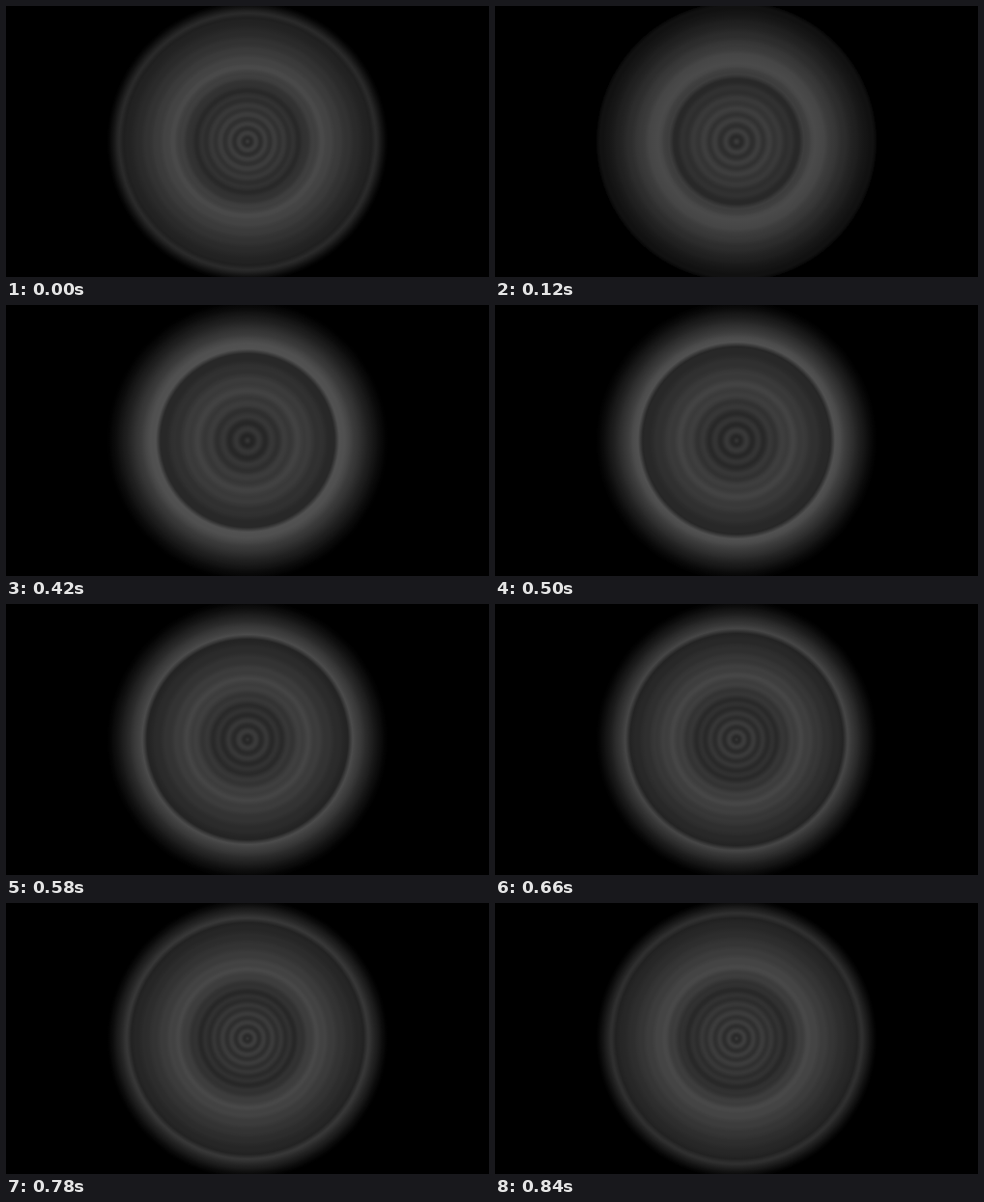
An HTML page with a canvas that plays this animation: 500x281 px, repeating every 0.88 s.

```html
<!DOCTYPE html>
<html>
<head>
<meta charset="utf-8">
<title>Ripples</title>
<style>
html, body { margin: 0; width: 100%; height: 100%; overflow: hidden; background: #000; }
canvas { display: block; width: 100vw; height: 100vh; }
</style>
</head>
<body>
<canvas id="stage" width="500" height="281"></canvas>
<script>
const ctx = document.getElementById('stage').getContext('2d');
const LOOP = 880;
const EDGE = 145;
const SPACING = 73;      // distance between two fronts, travelled once per loop
const FIRST_FRONT = 58;
const TAU = 2 * Math.PI;

// spans during which the picture rests
const rests = [[0, 60], [120, 200], [520, 580], [780, 840]];

const clamp01 = x => Math.min(1, Math.max(0, x));
const mix = (a, b, u) => a + (b - a) * u;
const rim = (r, width) => Math.sqrt(clamp01((EDGE - r) / width));

// grey of the brightest and darkest part of the big wave at a radius
const peak = r => Math.min(42 + 0.4 * r, 85 * rim(r, 45));
const trough = r => (48 - 0.12 * r) * rim(r, 17);

function steppedTime(t) {
  const rest = rests.find(([from, to]) => t >= from && t < to);
  return rest ? rest[0] : Math.floor(t / 20) * 20;
}

// Each front jumps up to a hump and falls off until the next front or the edge.
function bigWave(r, lead) {
  const front = lead + SPACING * Math.floor((r - lead) / SPACING);
  const end = Math.min(front + SPACING, EDGE);
  const hump = front + Math.max(2, 0.38 * (110 - front));
  const top = peak(hump);
  if (r < hump) {
    const sharpness = clamp01((front - 50) / 35);
    const foot = mix(trough(front), top, sharpness);
    return mix(foot, top, (r - front) / (hump - front));
  }
  const fall = 1 - Math.pow(clamp01(1 - (r - hump) / (end - hump)), 1.15);
  return mix(top, trough(end), fall);
}

function softWave(r, lead) {
  let sum = 0;
  for (let d = -2; d <= 2; d++) sum += bigWave(Math.min(EDGE, Math.abs(r + d)), lead);
  return sum / 5;
}

// Rings around the centre whose spacing breathes once per loop.
function rings(r, phase) {
  const spacing = 11.3 + 2.2 * Math.cos(TAU * (phase - 0.38));
  const shift = 0.1 * Math.sin(TAU * phase) - 0.1;
  return 11 * Math.exp(-r / 45) * Math.cos(TAU * (r / spacing - shift));
}

function draw(t) {
  const phase = steppedTime(t) / LOOP;
  const lead = FIRST_FRONT + SPACING * phase;
  const fill = ctx.createRadialGradient(250, 140.5, 0, 250, 140.5, EDGE);
  for (let r = 0; r <= EDGE; r++) {
    const fade = clamp01((EDGE - r) / 20);
    const v = Math.max(0, softWave(r, lead) + rings(r, phase) * fade).toFixed(1);
    fill.addColorStop(r / EDGE, `rgb(${v},${v},${v})`);
  }
  fill.addColorStop(1, '#000');
  ctx.fillStyle = fill;
  ctx.fillRect(0, 0, 500, 281);
}

const start = performance.now();
function tick() {
  draw((performance.now() - start) % LOOP);
  requestAnimationFrame(tick);
}
tick();
</script>
</body>
</html>
```
